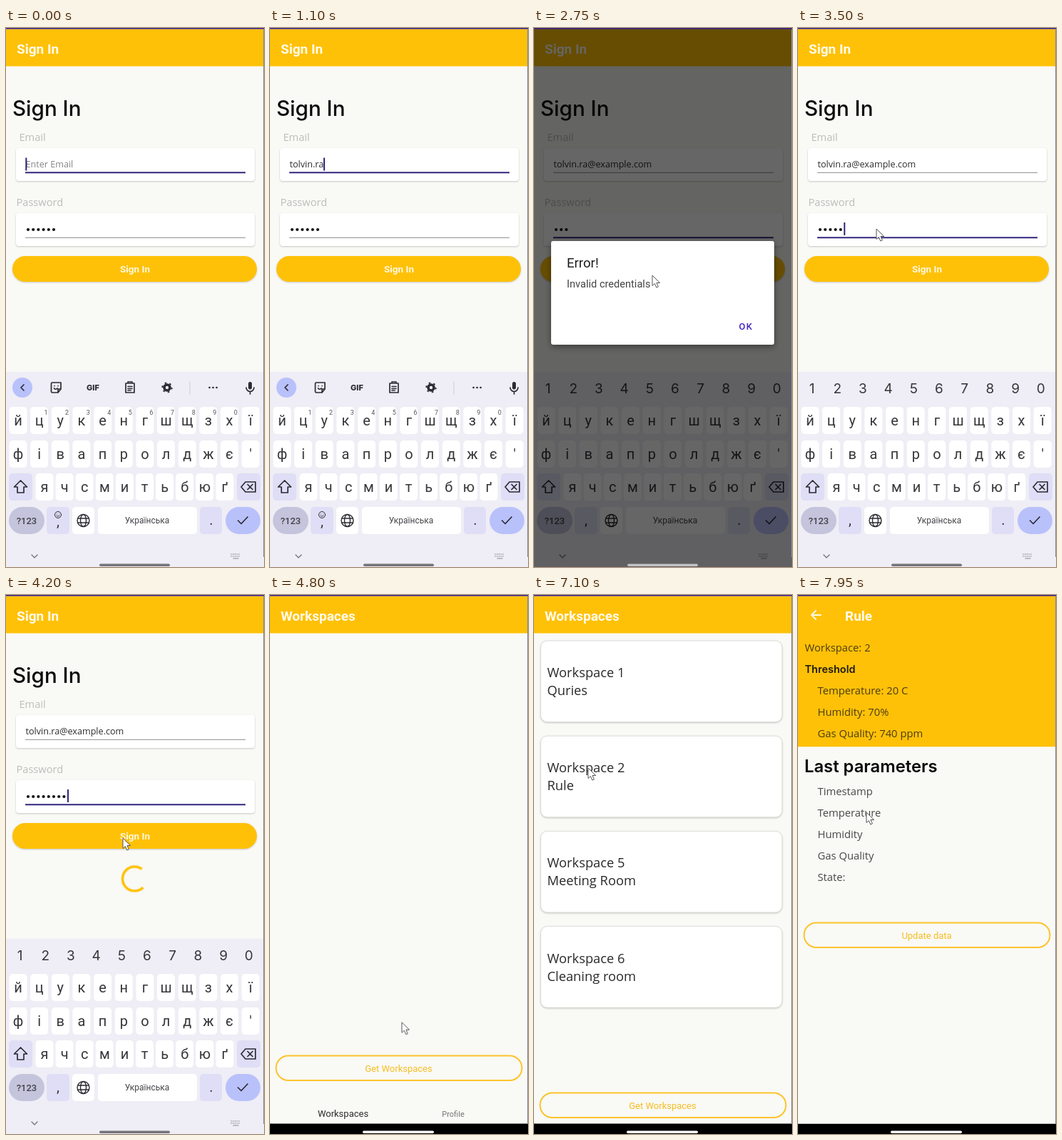
Write an HTML page that moves like this. It is 362 px wide and 754 px high and loops after 8 s.

```html
<!DOCTYPE html>
<html lang="en">
<head>
<meta charset="utf-8">
<title>Workspaces sign in</title>
<style>
html, body { margin: 0; width: 100%; height: 100%; overflow: hidden; background: #f9f9f5; }
svg { display: block; width: 100%; height: 100%; }
text { white-space: pre; }
.bar { font: 600 19px Roboto, sans-serif; fill: #fffbec; }
.title { font: 500 29.6px Inter, sans-serif; fill: #080808; }
.sub { font-weight: 600; font-size: 23.8px; }
.bold { font: 600 14.5px Inter, sans-serif; fill: #1d1a10; }
.label { font: 14.6px "Open Sans", sans-serif; fill: #bdbdbb; }
.field { font: 12.6px "Open Sans", sans-serif; fill: #2c2c2c; }
.hint { fill: #858585; }
.item { font: 18.3px "Open Sans", sans-serif; fill: #2a2a2a; }
.info { font: 14.8px "Open Sans", sans-serif; fill: #484848; }
.dark .info { fill: #4b3c12; }
.btn { font: 13px Roboto, sans-serif; fill: #f6bd22; text-anchor: middle; }
.btn.solid { font-weight: 600; font-size: 13.5px; fill: #fff8e0; }
.mid { text-anchor: middle; }
.key { font: 20px Roboto, sans-serif; fill: #36363c; text-anchor: middle; }
.digit { font: 19px Inter, sans-serif; fill: #36363c; text-anchor: middle; }
.small { font: 9px Roboto, sans-serif; fill: #55555c; text-anchor: middle; }
.space { font: 12px Roboto, sans-serif; fill: #44444a; text-anchor: middle; }
.mode { font-weight: 500; font-size: 13px; }
.card { fill: #fff; filter: drop-shadow(0 1px 1.2px #0003); }
.line { stroke: #a2a2a2; stroke-width: 1.2; }
.line.on { stroke: #30267c; stroke-width: 2; }
.outline { fill: none; stroke: #fcc42c; stroke-width: 2; }
.icon { fill: none; stroke: #2b2b33; stroke-width: 1.7; stroke-linecap: round; stroke-linejoin: round; }

#signin, #tools, #numbers, #dialog, #spin, #spinShow, #spaces, #list, #tabs, #get, #rule, #mouse {
  animation: 8s linear infinite;
}
#signin { animation-name: signin; }
#tools { animation-name: tools; }
#numbers { animation-name: numbers; }
#dialog { animation-name: dialog; }
#spinShow { animation-name: spinShow; }
#spin { animation-name: spin; transform-origin: 180.5px 397px; }
#spaces { animation-name: spaces; }
#list { animation-name: list; }
#tabs { animation-name: tabs; }
#get { animation-name: get; }
#rule { animation-name: rule; }
#mouse { animation-name: mouse; animation-timing-function: ease-in-out; }
@keyframes signin { 0%, 56.8% { visibility: visible } 56.81%, 100% { visibility: hidden } }
@keyframes tools { 0%, 28.12% { opacity: 1 } 28.125%, 100% { opacity: 0 } }
@keyframes numbers { 0%, 28.12% { opacity: 0 } 28.125%, 100% { opacity: 1 } }
@keyframes dialog { 0%, 32.4% { opacity: 0 } 34%, 38.5% { opacity: 1 } 39.6%, 100% { opacity: 0 } }
@keyframes spinShow { 0%, 51.2% { opacity: 0 } 51.21%, 55% { opacity: 1 } 55.01%, 100% { opacity: 0 } }
@keyframes spin { 0%, 51% { transform: rotate(-50deg) } 52.5% { transform: rotate(0) } 56%, 100% { transform: rotate(116deg) } }
@keyframes spaces { 0%, 55% { opacity: 0 } 56.6%, 100% { opacity: 1 } }
@keyframes list { 0%, 65% { opacity: 0 } 65.6%, 100% { opacity: 1 } }
@keyframes tabs { 0%, 88.1% { opacity: 1 } 88.11%, 100% { opacity: 0 } }
@keyframes get { 0%, 88.1% { transform: none } 88.11%, 100% { transform: translateY(52px) } }
@keyframes rule { 0%, 89.5% { opacity: 0 } 91%, 100% { opacity: 1 } }
@keyframes mouse {
  0%, 21.5% { transform: translate(375px, 300px) }
  25.5%, 26.8% { transform: translate(94px, 195px) }
  28%, 30% { transform: translate(100px, 278px) }
  32%, 35% { transform: translate(166px, 346px) }
  37.5%, 38.7% { transform: translate(297px, 415px) }
  40.7%, 48% { transform: translate(110px, 281px) }
  51%, 55.5% { transform: translate(164px, 340px) }
  62%, 65.2% { transform: translate(190px, 660px) }
  71%, 80.6% { transform: translate(375px, 430px) }
  87%, 90% { transform: translate(76px, 242px) }
  97%, 100% { transform: translate(96px, 304px) }
}
</style>
</head>
<body>
<svg viewBox="0 0 362 754" preserveAspectRatio="none">
  <rect width="362" height="754" fill="#f9f9f5"/>

  <g id="signin">
    <path d="M0 1.500h362v52H0z" fill="#ffc107"/>
    <text class="bar" x="15" y="36">Sign In</text>
    <text class="title" x="9" y="123">Sign In</text>
    <text class="label" x="18.500" y="158">Email</text>
    <rect class="card" x="14" y="168" width="335" height="46" rx="4"/>
    <path id="emailLine" class="line" d="M27 202.300h309"/>
    <text id="hint" class="field hint" x="27.500" y="195">Enter Email</text>
    <text id="email" class="field" x="27.500" y="195"></text>
    <text class="label" x="14.500" y="249">Password</text>
    <rect class="card" x="14" y="259" width="335" height="46" rx="4"/>
    <path id="passLine" class="line" d="M27 293.300h309"/>
    <g id="dots" fill="#111"></g>
    <rect id="caret" width="2" height="18" fill="#30267c"/>
    <rect x="9" y="319" width="343" height="36" rx="18" fill="#ffc107" style="filter:drop-shadow(0 1px 1px #0003)"/>
    <text class="btn solid" x="181" y="342">Sign In</text>
    <g id="spinShow"><g id="spin">
      <circle cx="180.500" cy="397" r="17" fill="none" stroke="#ffc107" stroke-width="3.600" stroke-dasharray="77 29.800" transform="rotate(45 180.500 397)"/>
    </g></g>

    <path d="M0 481h362v273H0z" fill="#efedf5"/>
    <g id="keys"></g>
    <g id="tools">
      <circle cx="23" cy="503" r="14" fill="#b9c1fb"/>
      <g class="icon">
        <path d="M25 499l-4 4 4 4"/>
        <path d="M65 496h12v9l-4 5H65a1.500 1.500 0 0 1-1.500-1.500V497.500A1.500 1.500 0 0 1 65 496zM77 505h-4v5M67.500 504q2 2.500 4.500 0M68 500.500v.1M73 500.500v.1"/>
        <path d="M168 497h12v13h-12zM171 497v-2h6v2zM171 501.500h6M171 504.500h6M171 507h4"/>
        <circle cx="226" cy="503" r="4" stroke-width="3.600"/>
        <circle cx="226" cy="503" r="6.600" stroke-width="2" stroke-dasharray="2.500 4.400" stroke-linecap="butt"/>
        <path d="M285.500 503h.1M290.500 503h.1M295.500 503h.1" stroke-width="2.600"/>
        <path d="M337 503a5.500 5.500 0 0 0 11 0M342.500 509v3"/>
        <path d="M342.500 497.500v5.500" stroke-width="5"/>
        <circle cx="73" cy="681" r="4.500" stroke-width="1"/>
        <path d="M71.500 680v.1M74.500 680v.1M71 682.500q2 1.500 4 0" stroke-width=".9"/>
      </g>
      <path d="M258 494v19" stroke="#cfcdd8"/>
      <text class="mid" x="122" y="507" style="font:800 11px Inter,sans-serif" fill="#2b2b33">GIF</text>
      <text class="key" x="73" y="697">,</text>
    </g>
    <g id="numbers"><text class="key" x="73" y="695">,</text></g>
    <g class="icon">
      <path d="M20.500 633l9 9h-4.500v8h-9v-8h-4.500z"/>
      <path d="M336 635h14v14h-14l-6-7zM339 638.500l7 7M346 638.500l-7 7"/>
      <circle cx="108.500" cy="689" r="8.500" stroke-width="1.400"/>
      <ellipse cx="108.500" cy="689" rx="4" ry="8.500" stroke-width="1.400"/>
      <path d="M101 686h15M101 692h15" stroke-width="1.400"/>
      <path d="M325.500 689l4.500 4.500 9-9.500"/>
      <path d="M36 737l4 4 4-4" stroke="#77777f" stroke-width="1.400"/>
      <path d="M316 736h13M316 739h13" stroke="#85858c" stroke-dasharray=".1 2.600" stroke-width="1.500"/>
      <path d="M319 742h7" stroke="#85858c" stroke-width="1.200"/>
    </g>
    <text class="space" x="198" y="693">Українська</text>
    <text class="space mode" x="29" y="693.500">?123</text>
    <text class="key" x="288" y="695">.</text>
    <rect x="131" y="749.500" width="99" height="3.500" rx="1.700" fill="#747478"/>

    <g id="dialog">
      <rect width="362" height="754" fill="#000" opacity=".6"/>
      <rect x="24" y="298" width="313" height="145" rx="3" fill="#fff" style="filter:drop-shadow(0 3px 5px #0006)"/>
      <text x="46" y="335" style="font:18.6px Roboto,sans-serif" fill="#1c1c1c">Error!</text>
      <text x="46" y="363" style="font:14.6px Roboto,sans-serif" fill="#444">Invalid credentials</text>
      <text x="287.500" y="422" style="font:500 13px Roboto,sans-serif;letter-spacing:1.2px" fill="#4527c4">OK</text>
      <rect x="131" y="749.500" width="99" height="3.500" rx="1.700" fill="#c4c4c6"/>
    </g>
  </g>

  <g id="spaces">
    <path d="M0 53h362v701H0z" fill="#f9f9f5"/>
    <path d="M0 1.500h362v52H0z" fill="#ffc107"/>
    <text class="bar" x="15" y="36">Workspaces</text>
    <g id="list"></g>
    <g id="get">
      <rect class="outline" x="8.500" y="644.500" width="345" height="34.500" rx="17.250"/>
      <text class="btn" x="180.500" y="667">Get Workspaces</text>
    </g>
    <g id="tabs" class="mid">
      <text x="102.500" y="729.500" style="font:13px Roboto,sans-serif" fill="#2c2c2c">Workspaces</text>
      <text x="257" y="729.500" style="font:11px Roboto,sans-serif" fill="#747474">Profile</text>
    </g>
    <path d="M0 739.500h362v14.500H0z"/>
    <rect x="130" y="749.500" width="100" height="3.500" rx="1.700" fill="#fff"/>
  </g>

  <g id="rule">
    <path d="M0 53h362v686.500H0z" fill="#f9f9f5"/>
    <path d="M0 1.500h362v210.800H0z" fill="#ffc107"/>
    <path class="icon" d="M32 28H19M25 22l-6 6 6 6" style="stroke:#fffbe8;stroke-width:2"/>
    <text class="bar" x="66" y="36">Rule</text>
    <g class="dark" id="limits"><text class="info" x="9.500" y="79">Workspace: 2</text></g>
    <text class="bold" x="9.500" y="109">Threshold</text>
    <text class="title sub" x="9" y="248">Last parameters</text>
    <g id="params"></g>
    <rect class="outline" x="8.500" y="458.500" width="345" height="34.500" rx="17.250"/>
    <text class="btn" x="180.500" y="481">Update data</text>
  </g>

  <path d="M0 0h362v1.500H0z" fill="#35197c"/>
  <path d="M361.500 2v738" stroke="#8d8b96"/>
  <path id="mouse" d="M0 0v14.500l3.400-3 2.400 5.500 2.600-1.100-2.400-5.400h4.600z" fill="#fff" stroke="#55555a"/>
</svg>
<script>
const $ = id => document.getElementById(id);

function add(parent, tag, attrs, text = '') {
  const el = document.createElementNS('http://www.w3.org/2000/svg', tag);
  for (const name in attrs) el.setAttribute(name, attrs[name]);
  el.textContent = text;
  $(parent).append(el);
  return el;
}
const write = (parent, style, x, y, text) => add(parent, 'text', { class: style, x, y }, text);
const key = (cx, cy, width, fill = '#fff', rx = 5) =>
  add('keys', 'rect', { x: cx - width / 2, y: cy - 19, width, height: 38, rx, fill });

function letterRow(letters, start, pitch, y) {
  [...letters].forEach((letter, i) => {
    const x = start + i * pitch;
    key(x, y, 25);
    write('keys', 'key', x, y + 7, letter);
  });
}
letterRow('йцукенгшщзхї', 17, 29.65, 549);
letterRow("фівапролджє'", 17, 29.65, 596);
letterRow('ячсмитьбюґ', 54, 28.1, 642);
const tint = '#dfdef6';
key(20.5, 642, 33, tint);
key(340.5, 642, 33, tint);
key(29, 689, 50, '#c4c4dc', 19);
key(73, 689, 32, tint);
key(108.5, 689, 31);
key(198.5, 689, 139);
key(287.5, 689, 31, tint);
key(332.5, 689, 49, '#b9c1fb', 19);
[...'1234567890'].forEach((digit, i) => {
  write('tools', 'small', 56 + i * 29.6, 541, digit);
  write('numbers', 'digit', 19.5 + i * 35.7, 511, digit);
});

[['1', 'Quries'], ['2', 'Rule'], ['5', 'Meeting Room'], ['6', 'Cleaning room']].forEach(([id, name], i) => {
  const y = 64 + i * 133.2;
  add('list', 'rect', { class: 'card', x: 9.5, y, width: 338.5, height: 113.5, rx: 9, stroke: '#dededb' });
  write('list', 'item', 18.5, y + 51, 'Workspace ' + id);
  write('list', 'item', 18.5, y + 76, name);
});

['Temperature: 20 C', 'Humidity: 70%', 'Gas Quality: 740 ppm']
  .forEach((text, i) => write('limits', 'info', 27.5, 139 + i * 30, text));
['Timestamp', 'Temperature', 'Humidity', 'Gas Quality', 'State:']
  .forEach((text, i) => write('params', 'info', 27.5, 280 + i * 30, text));

const dots = Array.from({ length: 8 }, (_, i) =>
  add('dots', 'circle', { cx: 31 + i * 7.2, cy: 282, r: 2.1 }));

const address = 'tolvin.ra@example.com';
const LOOP = 8000, FOCUS_PASSWORD = 2250;

function dotCount(t) {
  if (t < 2300) return 6;
  if (t < 3300) return Math.min(3, Math.floor((t - 2300) / 60));
  return Math.min(8, 3 + Math.floor((t - 3300) / 100));
}

function render(t) {
  const typed = Math.max(0, Math.min(address.length, Math.floor((t - 200) / 93)));
  const count = dotCount(t);
  const onPassword = t >= FOCUS_PASSWORD;
  $('email').textContent = address.slice(0, typed);
  $('hint').style.display = typed ? 'none' : '';
  $('emailLine').classList.toggle('on', !onPassword);
  $('passLine').classList.toggle('on', onPassword);
  dots.forEach((dot, i) => dot.style.display = i < count ? '' : 'none');
  const caretX = onPassword ? 28 + count * 7.25 : 27.3 + (typed ? $('email').getComputedTextLength() : 0);
  $('caret').setAttribute('x', caretX);
  $('caret').setAttribute('y', onPassword ? 272 : 181.5);
  const covered = t > 2600 && t < 3150;
  $('caret').style.display = covered ? 'none' : '';
}

let start;
function tick(now) {
  start ??= now;
  render((now - start) % LOOP);
  requestAnimationFrame(tick);
}
render(0);
requestAnimationFrame(tick);
</script>
</body>
</html>
```
